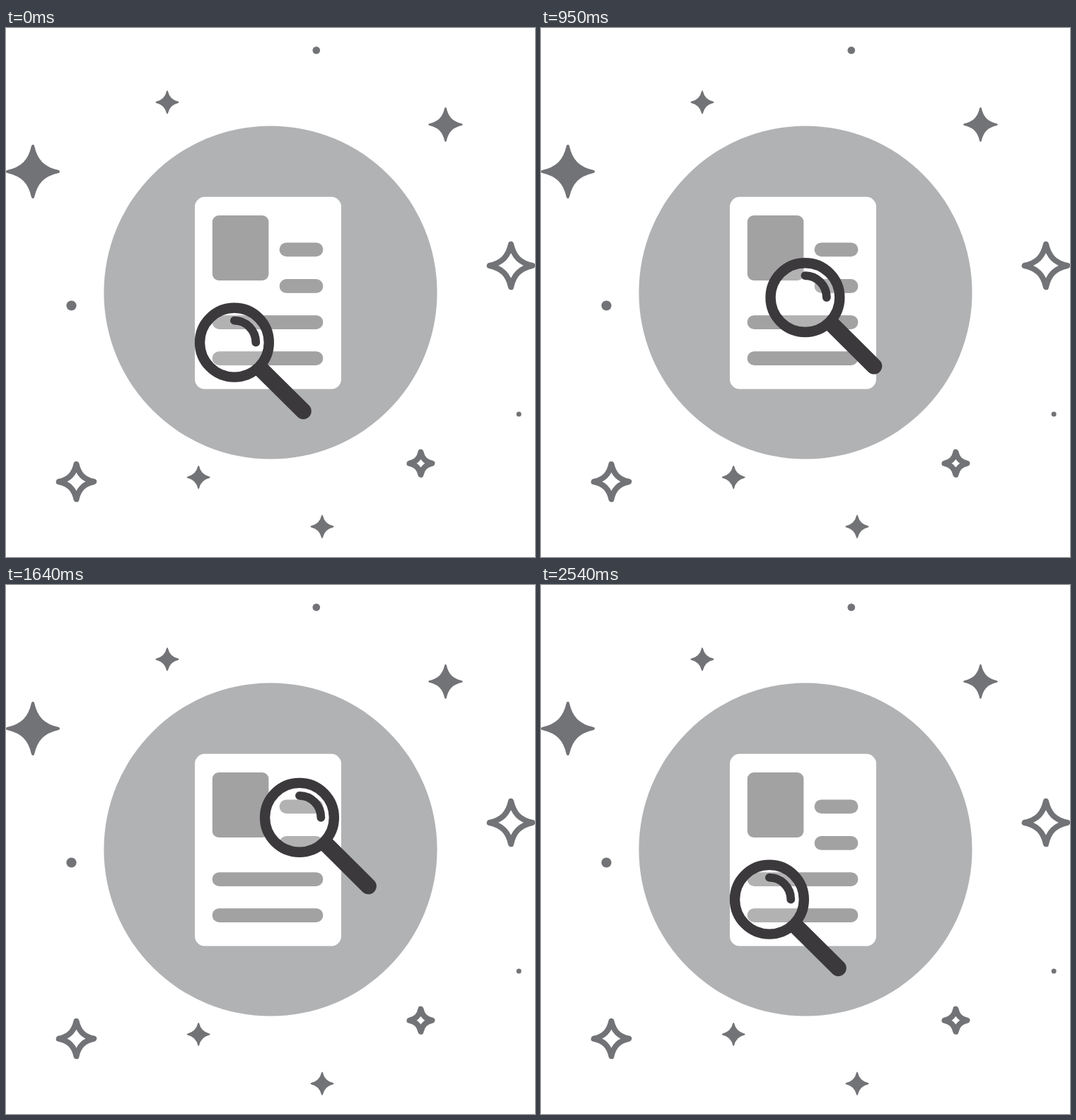
These frames come from a looping animation (748x748 px, 2.77 s). An HTML page:

```html
<!DOCTYPE html>
<html lang="en">
<head>
<meta charset="utf-8">
<title>Document search</title>
<style>
  html, body { margin: 0; width: 100%; height: 100%; overflow: hidden; background: #fff; }
  svg { display: block; width: 100%; height: 100%; }
  .line { fill: none; stroke: #3b393c; stroke-linecap: round; }
</style>
</head>
<body>
<svg viewBox="0 0 748 748">
  <g id="sky"></g>
  <circle cx="374" cy="374" r="235.6" fill="#b1b2b4"/>
  <rect x="267" y="238.8" width="207" height="271.8" rx="14" fill="#fff"/>
  <g fill="#a2a2a2">
    <rect x="291.8" y="265" width="79.6" height="92" rx="9"/>
    <rect x="386.6" y="303.4" width="61.8" height="19.8" rx="9.9"/>
    <rect x="386.6" y="355" width="61.8" height="19.8" rx="9.9"/>
    <rect x="291.6" y="406.2" width="156.8" height="19.8" rx="9.9"/>
    <rect x="291.6" y="457.2" width="156.8" height="19.8" rx="9.9"/>
  </g>
  <g id="glass">
    <circle r="45" fill="#fff" fill-opacity=".17"/>
    <circle class="line" r="48.9" stroke-width="14.4"/>
    <path class="line" stroke-width="11.8" d="M0 -31A30.4 31 0 0 1 30.4 0"/>
    <path class="line" stroke-width="23" d="M38.6 38.6L97.4 97"/>
  </g>
</svg>
<script>
const NS = 'http://www.w3.org/2000/svg';
const INK = '#727376';
const sky = document.getElementById('sky');
const glass = document.getElementById('glass');

function add(tag, attrs) {
  const el = document.createElementNS(NS, tag);
  for (const key in attrs) el.setAttribute(key, attrs[key]);
  sky.append(el);
}

// Four-pointed star; size is the distance from centre to a rounded tip.
function star(x, y, size, stroke, fill) {
  const r = size - stroke / 2, a = r * 0.13, b = r * 0.42;
  const d = `M0 ${-r}C${a} ${-b} ${b} ${-a} ${r} 0C${b} ${a} ${a} ${b} 0 ${r}` +
    `C${-a} ${b} ${-b} ${a} ${-r} 0C${-b} ${-a} ${-a} ${-b} 0 ${-r}Z`;
  add('path', { d, fill, stroke: INK, 'stroke-width': stroke,
    'stroke-linejoin': 'round', transform: `translate(${x} ${y})` });
}

[[38, 203, 38], [228, 105, 16.4], [621.5, 136.5, 24.2], [272.2, 635.3, 16.4], [447, 705, 16.4]]
  .forEach(([x, y, size]) => star(x, y, size, size * 0.11, INK));
[[714, 336, 34.3], [99.5, 641.5, 28.8], [586.5, 615.6, 20]]
  .forEach(([x, y, size]) => star(x, y, size, 8, '#fff'));
[[438.8, 31.5, 5.3], [92.5, 392.5, 7.1], [725.2, 546, 3.5]]
  .forEach(([cx, cy, r]) => add('circle', { cx, cy, r, fill: INK }));

const LOOP = 2770, START = 470, STEP = 30, PEAK = 34, END = 69;
const HOME = { x: 322.9, y: 444.7 }, TRAVEL = { x: 107.4, y: -135.2 };

function render(ms) {
  const n = Math.min(END, Math.max(0, Math.floor((ms - START) / STEP + 1e-6)));
  const k = ms < START + STEP ? 0 : n <= PEAK ? n / PEAK : (END - n) / (END - PEAK);
  glass.setAttribute('transform',
    `translate(${HOME.x + TRAVEL.x * k} ${HOME.y + TRAVEL.y * k})`);
}

const origin = performance.now();
function tick(now) {
  render(Math.max(0, now - origin) % LOOP);
  requestAnimationFrame(tick);
}
render(0);
requestAnimationFrame(tick);
</script>
</body>
</html>
```
